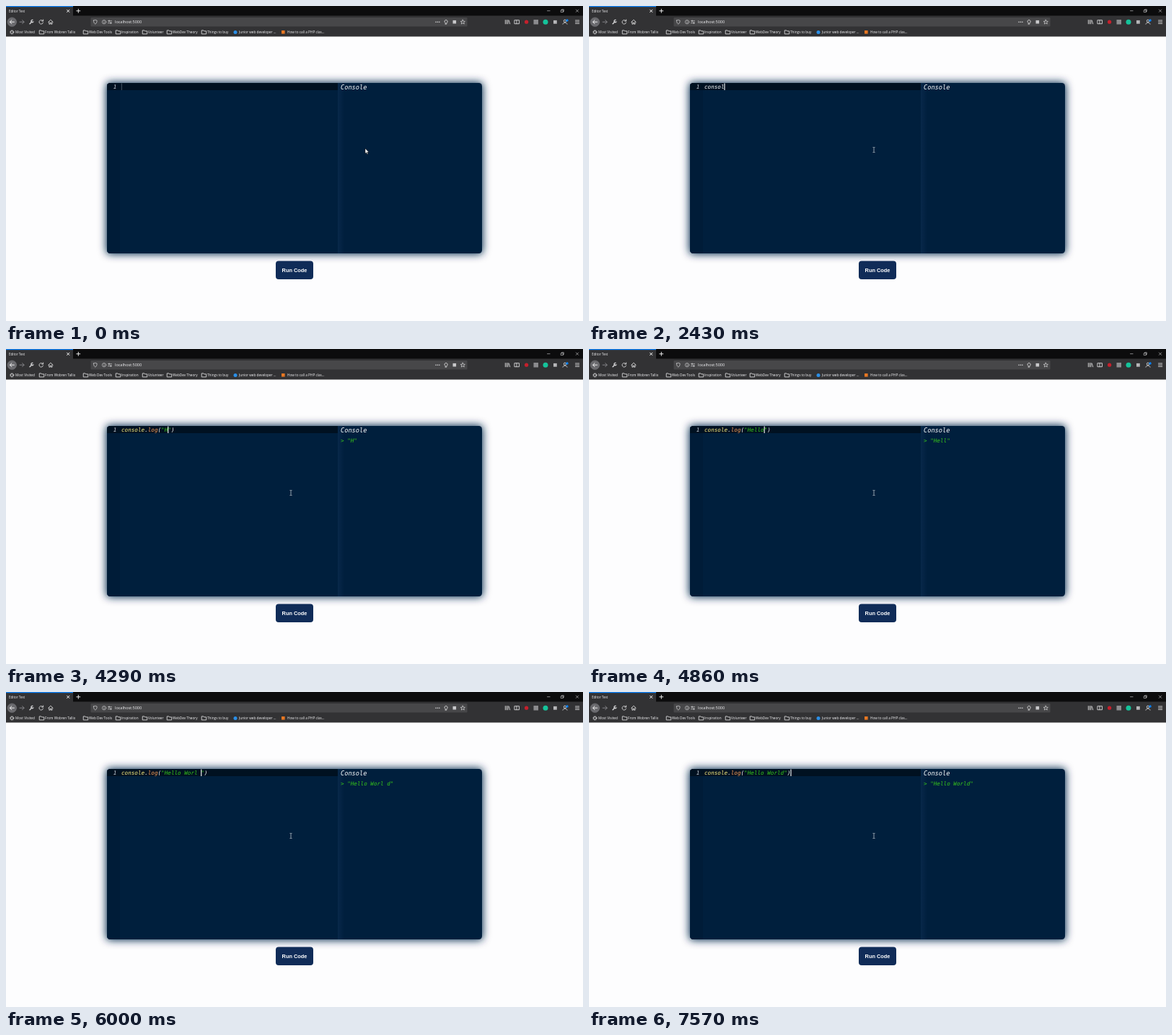
Write an HTML page that moves like this. It is 800 px wide and 438 px high and loops after 8 s.

```html
<!DOCTYPE html>
<html lang="en">
<head>
<meta charset="utf-8">
<title>Editor Test</title>
<style>
  html, body { margin: 0; width: 100%; height: 100%; overflow: hidden; background: #fdfdfe; }
  svg { display: block; width: 800px; height: 438px; }
  text { white-space: pre; }
  .ui { font-family: "Open Sans", "Noto Sans", sans-serif; font-size: 4.72px; fill: #f4f4f6; }
  .mono { font-family: "DejaVu Sans Mono", monospace; font-style: italic; font-size: 7.64px; fill: #fff; }
  .line { fill: none; stroke: #d8d8da; stroke-width: .9; stroke-linecap: round; stroke-linejoin: round; }
  .green { fill: #37c71a; }
</style>
</head>
<body>
<svg viewBox="0 0 800 438">
  <defs>
    <filter id="glow" x="-10%" y="-20%" width="120%" height="140%">
      <feGaussianBlur stdDeviation="6"/>
    </filter>
    <linearGradient id="split">
      <stop offset="0" stop-color="#08284a"/>
      <stop offset="1" stop-color="#001f3d"/>
    </linearGradient>
    <clipPath id="panel"><rect x="140" y="107" width="520" height="237" rx="4.5"/></clipPath>
    <path id="folder" class="line" d="M.6 1.2h2.3l.8 1h3v4H.6z"/>
  </defs>

  <!-- window -->
  <rect width="800" height="438" fill="#fdfdfe"/>
  <rect width="800" height="14" fill="#0c0c0d"/>
  <rect y="13.5" width="800" height="29" fill="#323234"/>
  <rect width="93" height="14" fill="#323234"/>
  <rect width="93" height="1.2" fill="#0a84ff"/>
  <rect x="117.500" y="16" width="522" height="12.500" rx="1.200" fill="#474749"/>
  <g class="ui">
    <text x="4" y="9" font-size="4.5">Editor Test</text>
    <text x="151" y="24.300" style="font-size:5.5px">localhost:5000</text>
    <g id="marks"></g>
  </g>
  <g class="line">
    <path d="M84.500 5.200l3.400 3.400m0-3.400l-3.400 3.400M97.800 6.800h5m-2.500-2.500v5" stroke="#fff"/>
    <path d="M750.500 6.700h3.600M769.600 5.800h2.800v2.800h-2.800zM770.500 5.600v-.8h2.800v2.800h-.8M790.300 5l3.400 3.400m0-3.400l-3.400 3.400" stroke-width=".6"/>
    <circle cx="8.300" cy="22.200" r="6.300" fill="#6a6a6e" stroke="#77777b" stroke-width=".5"/>
    <path d="M11.300 22.200H5.500m2.400-2.500l-2.500 2.500 2.500 2.500" stroke="#fff"/>
    <path d="M19 22.200h6m-2.400-2.500l2.500 2.500-2.500 2.500" stroke="#8c8c90"/>
    <path d="M33 24.800l3-3" stroke-width="1.500"/>
    <path d="M37 19.400a1.700 1.700 0 1 0 1 2.400" stroke-width="1.200"/>
    <path d="M51 20.600a2.800 2.800 0 1 0 .5 2.400M51.600 19v2h-2"/>
    <path d="M58.700 22.300l3.200-3.100 3.200 3.100M59.800 22v3.200h1.400v-2h1.400v2H64V22"/>
    <path d="M121.500 20.100l2.300-.7 2.300.7c0 2.600-.6 4-2.300 5-1.700-1-2.300-2.400-2.300-5z" stroke-width=".7"/>
    <circle cx="136" cy="22.200" r="2.700" stroke-width=".6"/>
    <path d="M136 22v1.600M136 20.700v.1M141.500 20.800h5M141.500 23.600h5" stroke-width=".7"/>
    <path d="M143 20v1.600M145.300 22.800v1.600" stroke-width="1"/>
    <path d="M596 22.200h.1M598.400 22.200h.1M600.800 22.200h.1" stroke-width="1.500"/>
    <path d="M609.200 23.500a2.100 2.100 0 1 1 1.700 0v1.600h-1.700z"/>
    <path d="M633.300 19.200l.9 2 2.200.2-1.700 1.400.6 2.200-2-1.200-2 1.200.6-2.200-1.700-1.400 2.200-.2z" stroke-width=".7"/>
    <path d="M692.300 19.600v5.200M694.200 19.600v5.200M696 19.600v5.200M697.200 20l1.500 4.800"/>
    <path d="M705.300 19.700h6.200v5h-6.200zM708 19.700v5"/>
    <circle cx="775" cy="20.800" r="1.700"/>
    <path d="M772 25.200c.4-3 5.600-3 6 0"/>
    <path d="M789.500 20h5.200M789.500 22.200h5.200M789.500 24.400h5.200"/>
    <circle cx="8.300" cy="36.400" r="1.900"/>
    <circle cx="8.300" cy="36.400" r="2.700" stroke-dasharray="1 1.120" stroke-linecap="butt"/>
  </g>
  <rect x="619.500" y="19.900" width="4.600" height="4.600" fill="#c8c8ca"/>
  <circle cx="721.600" cy="22.200" r="2.600" fill="#c5202c"/>
  <rect x="731.500" y="19" width="6.500" height="6.500" fill="#8b8b8e"/>
  <circle cx="748" cy="22.200" r="3.500" fill="#15c39a"/>
  <rect x="759" y="19.900" width="4.800" height="4.800" fill="#b6b6b8"/>
  <circle cx="778" cy="20" r="1.700" fill="#0a84ff"/>
  <circle cx="318" cy="36.400" r="2.500" fill="#2a8fe8"/>
  <rect x="382" y="34" width="4.600" height="4.600" fill="#e87722"/>

  <!-- editor and console -->
  <rect x="139" y="106" width="522" height="239" rx="5" fill="#00284c" filter="url(#glow)"/>
  <g clip-path="url(#panel)">
    <rect x="140" y="107" width="520" height="237" fill="#001f3d"/>
    <rect x="140" y="107" width="18" height="237" fill="#001c38"/>
    <rect x="140" y="107" width="320" height="10" fill="#001121"/>
    <rect x="460" y="107" width="9" height="237" fill="url(#split)"/>
  </g>
  <text class="mono" x="148.800" y="115.300" style="fill:#c5cdd5">1</text>
  <text class="mono" x="464" y="116.200" style="font-size:8.640px">Console</text>
  <text class="mono" x="160" y="115.300" id="code"><tspan id="word"></tspan><tspan></tspan><tspan fill="#ff9e59"></tspan><tspan></tspan><tspan class="green"></tspan><tspan></tspan></text>
  <text class="mono green" x="464" y="130.200" id="out"></text>
  <rect id="caret" y="107.500" width="1.100" height="9.500"/>

  <rect x="374" y="354.500" width="52" height="25.500" rx="4" fill="#102c58"/>
  <text x="400" y="369.600" text-anchor="middle" fill="#fff" font-family="Liberation Sans, Arial, sans-serif" font-size="7.400" font-weight="700">Run Code</text>

  <!-- pointers -->
  <path id="arrow" d="M0 0v7.200l1.700-1.500 1.100 2.600 1.200-.5-1.100-2.500h2.200z" fill="#fff" stroke="#000" stroke-width=".5"/>
  <path id="beam" d="M-1.500-3.500h1.100l.4.400.4-.4h1.100M0-3.100v6.200M-1.500 3.500h1.100l.4-.4.4.4h1.100" fill="none" stroke="#c3cad0" stroke-width=".75"/>
</svg>
<script>
  const $ = id => document.getElementById(id);
  const LOOP = 8000, ADVANCE = 4.6;

  const folders = [[46, "From Wobren Tallix"], [107, "Web Dev Tools"], [152, "Inspiration"],
    [189, "Volunteer"], [223, "WebDev Theory"], [271, "Things to buy"]];
  const links = [[13, "Most Visited"], [323, "Junior web developer ..."], [390, "How to call a PHP clas..."]];
  const label = (x, s) => `<text x="${x}" y="38.2">${s}</text>`;
  $("marks").innerHTML = links.map(([x, s]) => label(x, s)).join("") +
    folders.map(([x, s]) => `<use href="#folder" x="${x}" y="32.7"/>` + label(x + 8, s)).join("");

  // time, text before the caret, text after it, console value
  const say = (t, s, out = s) => [t, `console.log("${s}`, '")', `> "${out}"`];
  const typing = [
    [0, "", "", ""], [2000, "c", "", ""], [2140, "con", "", ""], [2290, "cons", "", ""],
    [2430, "consol", "", ""], [2570, "console", "", ""], [2710, "console.", "", ""],
    [2860, "console.l", "", ""], [3000, "console.lo", "", ""], [3140, "console.log", "", ""],
    [3290, "console.log(", ")", ""],
    say(3710, ""), say(4290, "H"), say(4570, "He"), say(4710, "Hell"),
    say(4860, "Hello", "Hell"), say(5000, "Hello"), say(5140, "Hello "),
    say(5290, "Hello W"), say(5430, "Hello Wor", "Hello Wo"), say(5570, "Hello Worl"),
    say(5710, "Hello Worl d"), say(6000, "Hello Worl ", "Hello Worl d"),
    say(6140, "Hello Worl", "Hello Worl "), say(6290, "Hello Worl"),
    say(6430, "Hello World", "Hello Worl"), say(6570, "Hello World"),
    [7140, 'console.log("Hello World"', ")", '> "Hello World"'],
    [7290, 'console.log("Hello World")', "", '> "Hello World"']
  ];
  const pointer = [[0, "arrow", 498, 198], [140, "arrow", 461, 203],
    [430, "beam", 434, 214], [570, "beam", 404, 207], [710, "beam", 395, 200]];
  const tokens = /^(\w*)(\.?)(\w*)(\(?)(".*")?(\)?)$/;

  const at = (list, t) => list.filter(e => e[0] <= t).pop();

  function draw(t) {
    const [, before, after, out] = at(typing, t);
    const parts = (before + after).match(tokens);
    [...$("code").children].forEach((span, i) => span.textContent = parts[i + 1] || "");
    $("word").setAttribute("fill", parts[1] === "console" ? "#ffee80" : "#fff");
    $("out").textContent = out;

    $("caret").setAttribute("x", 159.8 + before.length * ADVANCE);
    $("caret").setAttribute("fill", t < 710 ? "#40505e" : "#fff");
    $("caret").style.opacity = t >= 1290 && t < 1710 ? 0 : 1;

    const [, shape, x, y] = at(pointer, t);
    for (const id of ["arrow", "beam"]) $(id).style.display = id === shape ? "" : "none";
    $(shape).setAttribute("transform", `translate(${x} ${y})`);
  }

  const start = performance.now();
  function frame() {
    draw((performance.now() - start) % LOOP);
    requestAnimationFrame(frame);
  }
  frame();
</script>
</body>
</html>
```
